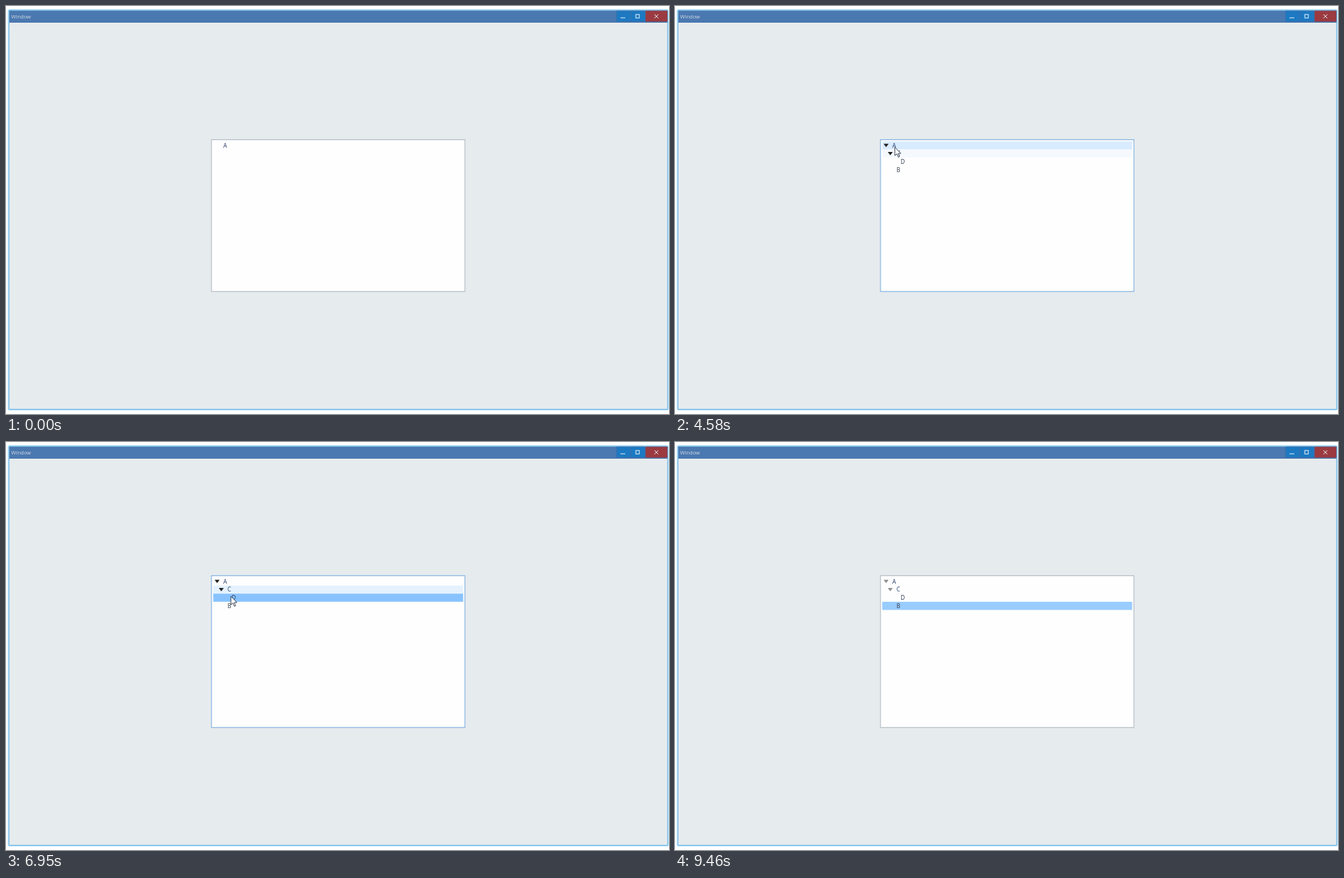
An HTML page for the animation above (9530 ms loop, 955 by 587 pixels).

```html
<!DOCTYPE html>
<html lang="en">
<head>
<meta charset="utf-8">
<title>Window</title>
<style>
  html, body { margin: 0; width: 100%; height: 100%; overflow: hidden; background: #fff; }
  svg { display: block; width: 955px; height: 587px; }
  text { font-family: "Open Sans", "Noto Sans", sans-serif; font-size: 8.4px; }
  .title { font-size: 7.5px; fill: #d3dae2; }
</style>
</head>
<body>
<svg viewBox="0 0 955 587">
  <!-- window frame -->
  <rect x="3.5" y="5.5" width="950" height="575.5" rx="1.5" fill="none" stroke="#d2eefc" stroke-width="2.6"/>
  <rect x="4.2" y="6.2" width="949" height="574.2" rx="1" fill="#e6ebee" stroke="#66b5e8" stroke-width="1.2"/>
  <rect x="4.8" y="6.8" width="948" height="17.2" fill="#4a78b0"/>
  <text class="title" x="7.6" y="18.3">Window</text>
  <g stroke="#3a6fa6" stroke-width=".7">
    <path d="M879.5 7h20v15.3h-20zM900 7h20.5v15.3H900z" fill="#1c79c2"/>
    <path d="M921.5 7h31v15.3h-31z" fill="#9b3a40" stroke="#7d4660"/>
  </g>
  <g fill="none" stroke="#e8f0f6">
    <path d="M885 17h7M934 12l5.6 5.6M939.6 12l-5.6 5.6"/>
    <rect x="907.2" y="12.2" width="5" height="5"/>
  </g>

  <!-- tree -->
  <rect id="box" x="296" y="192.3" width="365" height="218.5" fill="#fefefe"/>
  <g id="tree"></g>
  <path id="cursor" d="M0 0V12.2L2.8 9.6L4.9 14.4L6.8 13.6L4.8 9H8.6Z" fill="#fff" stroke="#111b30" stroke-width=".8" stroke-linejoin="round"/>
</svg>
<script>
const LOOP = 9530, FADE = 200;
const ENTER = 1150, LEAVE = 9455;

// pointer moves: each starts where the last one ended
const START = { x: 793, y: 528 };
const MOVES = [
  { from: 860, to: 1770, x: 309, y: 208 },
  { from: 1840, to: 2230, x: 304, y: 202 },
  { from: 2390, to: 3160, x: 313, y: 212 },
  { from: 4260, to: 4740, x: 318, y: 200 },
  { from: 5300, to: 5460, x: 327, y: 211 },
  { from: 5460, to: 5860, x: 323, y: 210 },
  { from: 6010, to: 6800, x: 324, y: 222 },
  { from: 7170, to: 7720, x: 323, y: 237 },
  { from: 7900, to: 8590, x: 855, y: 491 },
  { from: 8830, to: 9220, x: 930, y: 586 }
];

// a row keeps the state until the next entry
const HOVERED = [['A', 2000], ['C', 2860], ['A', 4420], ['C', 5410], ['D', 6600], ['B', 7400], ['', 7990]];
const CLICKED = [['A', 5060], ['C', 6010], ['D', 6800], ['B', 7720]];

const OPEN_A = 2690, OPEN_C = 3715;
const ROWS = [
  { name: 'A', depth: 0, shown: 0, opened: OPEN_A, ink: '#24396b' },
  { name: 'C', depth: 1, shown: OPEN_A, opened: OPEN_C, ink: '#1f4474' },
  { name: 'D', depth: 2, shown: OPEN_C, ink: '#22304c' },
  { name: 'B', depth: 1, shown: OPEN_A, ink: '#343b46' }
];

const PLAIN = [254, 254, 254], HOVER = [208, 230, 255];
const SELECTED = [153, 204, 255], ACTIVE = [112, 183, 255];
const TOP = 194.8, PITCH = 11.7, LEFT = 313, INDENT = 6;

const $ = id => document.getElementById(id);
const clamp = v => Math.max(0, Math.min(1, v));
const smooth = k => k * k * (3 - 2 * k);
const lerp = (a, b, k) => a + (b - a) * k;
const mix = (a, b, k) => a.map((v, i) => lerp(v, b[i], k));
const fade = (t, at) => clamp((t - at) / FADE);

function level(events, name, t) {
  return events.reduce((sum, [row, at], i) => {
    if (row !== name) return sum;
    const next = events[i + 1];
    return sum + fade(t, at) - (next ? fade(t, next[1]) : 0);
  }, 0);
}

function set(el, attrs) {
  for (const k in attrs) el.setAttribute(k, attrs[k]);
  return el;
}

function add(tag, attrs) {
  const el = document.createElementNS('http://www.w3.org/2000/svg', tag);
  return $('tree').appendChild(set(el, attrs));
}

for (const row of ROWS) row.band = add('rect', { x: 298.5, width: 360, height: PITCH });
for (const row of ROWS) {
  row.x = LEFT + INDENT * row.depth;
  row.label = add('text', { x: row.x, fill: row.ink });
  row.label.textContent = row.name;
  if (row.opened) row.arrow = add('path', { d: 'M-3.6 -2.4H3.6L0 2.4Z', fill: '#222' });
}

function pointer(t) {
  let { x, y } = START;
  for (const m of MOVES) {
    const k = smooth(clamp((t - m.from) / (m.to - m.from)));
    x = lerp(x, m.x, k);
    y = lerp(y, m.y, k);
  }
  return [x, y];
}

function drawRow(row, y, t) {
  const visibility = t >= row.shown ? 'visible' : 'hidden';
  const h = level(HOVERED, row.name, t), s = level(CLICKED, row.name, t);
  const color = mix(mix(PLAIN, HOVER, h), mix(SELECTED, ACTIVE, h), s);
  set(row.band, { visibility, y, fill: `rgb(${color.map(Math.round)})` });
  set(row.label, { visibility, y: y + 8.9 });
  if (row.arrow) {
    const turn = t >= row.opened ? 0 : -90;
    set(row.arrow, {
      visibility,
      opacity: t >= LEAVE ? 0.5 : fade(t, ENTER),
      transform: `translate(${row.x - 8.9} ${y + 5.8}) rotate(${turn})`
    });
  }
}

function draw(t) {
  const focused = t >= ENTER && t < LEAVE;
  set($('box'), { stroke: focused ? '#72a9dc' : '#abb5bd' });

  let y = TOP;
  for (const row of ROWS) {
    drawRow(row, y, t);
    if (t >= row.shown) y += PITCH;
  }

  const moving = t >= MOVES[0].from && t < LEAVE;
  set($('cursor'), {
    visibility: moving ? 'visible' : 'hidden',
    transform: `translate(${pointer(t)})`
  });
}

const start = performance.now();
function tick() {
  draw((performance.now() - start) % LOOP);
  requestAnimationFrame(tick);
}
tick();
</script>
</body>
</html>
```
